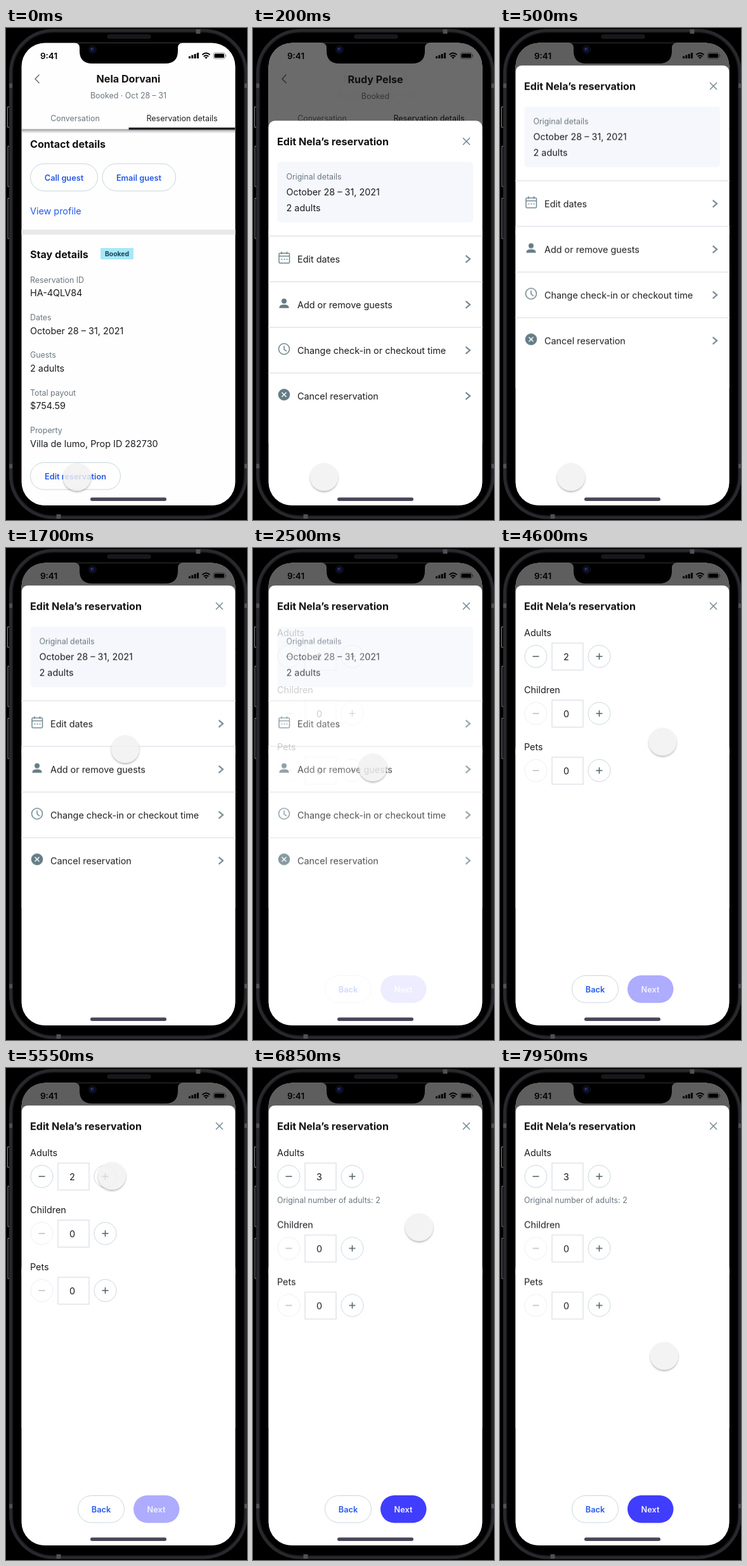
These frames come from a looping animation (380x776 px, 8000 ms). An HTML page:

```html
<!DOCTYPE html>
<html lang="en">
<head>
<meta charset="utf-8">
<title>Edit reservation</title>
<style>
html, body { margin: 0; width: 100%; height: 100%; overflow: hidden; background: #000; }
svg { display: block; width: 100vw; height: 100vh; }
text { font: 400 14.4px Inter, sans-serif; fill: #1b1c20; dominant-baseline: central; }
.small { font-size: 12.4px; fill: #6a7780; }
.tab { font-size: 12.5px; fill: #222; }
.title { font-size: 16.1px; font-weight: 700; fill: #121214; }
.button { font-size: 12.75px; font-weight: 600; fill: #2459ec; }
.mid { text-anchor: middle; }
.pill { fill: #fff; stroke: #c9d5dc; }
.line { stroke: #e1e3e7; stroke-width: 1.5; }
.icon { fill: none; stroke: #6f868f; stroke-width: 1.5; }
.sign { stroke: #4e616a; }
.solid { fill: #657d87; }
.off { opacity: .4; }

.anim { animation: 8s infinite both; }
.leave { animation-name: leave; }
.arrive { animation-name: arrive; }
.dim { animation-name: dim; }
.sheet { animation-name: rise; }
.menu { animation-name: menu; }
.form { animation-name: form; }
.before { animation-name: before; }
.after { animation-name: after; }
.shift { animation-name: shift; }
.next { animation-name: next; }
.cursor { animation-name: cursor; }

@keyframes leave {
  0% { opacity: 1; animation-timing-function: cubic-bezier(.25,1,.5,1); }
  4.375%, 100% { opacity: 0; }
}
@keyframes arrive {
  0% { opacity: 0; animation-timing-function: cubic-bezier(.33,1,.68,1); }
  4.375%, 100% { opacity: 1; }
}
@keyframes dim {
  0% { opacity: 0; animation-timing-function: cubic-bezier(.33,1,.68,1); }
  4.375%, 100% { opacity: .63; }
}
@keyframes rise {
  0% { transform: translateY(695px); animation-timing-function: cubic-bezier(.42,1,.78,1); }
  4.375%, 100% { transform: none; }
}
@keyframes menu {
  0%, 30.7% { opacity: 1; animation-timing-function: ease-out; }
  34.7%, 100% { opacity: 0; }
}
@keyframes form {
  0%, 30.7% { opacity: 0; animation-timing-function: ease-out; }
  34.7%, 100% { opacity: 1; }
}
@keyframes before {
  0%, 72% { opacity: 1; animation-timing-function: ease-out; }
  75.6%, 100% { opacity: 0; }
}
@keyframes after {
  0%, 72% { opacity: 0; animation-timing-function: ease-out; }
  75.6%, 100% { opacity: 1; }
}
@keyframes shift {
  0%, 72% { transform: none; animation-timing-function: ease-out; }
  75.6%, 100% { transform: translateY(23.5px); }
}
@keyframes next {
  0%, 72% { fill: #aeacff; animation-timing-function: ease-out; }
  75.6%, 100% { fill: #403dff; }
}
@keyframes cursor {
  0%, 9.5% { transform: translate(112px, 708px); animation-timing-function: ease-in-out; }
  20.8%, 21.5% { transform: translate(188px, 317px); animation-timing-function: ease-in-out; }
  29%, 33% { transform: translate(189px, 346px); animation-timing-function: ease-in-out; }
  40.6%, 54.4% { transform: translate(274px, 350.5px); animation-timing-function: ease-in-out; }
  60.6%, 62% { transform: translate(239px, 261px); animation-timing-function: ease-in-out; }
  66.9%, 68.2% { transform: translate(174px, 171px); }
  69.375%, 71.9% { transform: translate(167px, 170px); }
  73%, 80.7% { transform: translate(157px, 171px); animation-timing-function: ease-in-out; }
  85.6%, 95.7% { transform: translate(262px, 251px); animation-timing-function: ease-in-out; }
  99.375%, 100% { transform: translate(259px, 454px); }
}
</style>
</head>
<body>
<svg viewBox="0 0 380 776" preserveAspectRatio="none">
  <defs>
    <clipPath id="screen"><rect x="24.5" y="23.5" width="337" height="729.5" rx="37"/></clipPath>
    <filter id="soft" x="-30%" y="-30%" width="160%" height="170%">
      <feDropShadow dx="0" dy="2" stdDeviation="1.5" flood-opacity=".35"/>
    </filter>
    <linearGradient id="fade" x2="0" y2="1">
      <stop stop-color="#777" stop-opacity=".75"/><stop offset="1" stop-color="#999" stop-opacity="0"/>
    </linearGradient>
    <path id="chevron" d="M335.5 -5.5 342 0 335.5 5.5" fill="none" stroke="#7b8b95" stroke-width="2.3"/>
    <g id="minus"><circle cx="56.5" r="17.5" class="pill"/><path d="M51.5 0h10" class="icon sign"/></g>
    <g id="plus"><circle cx="156.5" r="17.5" class="pill"/><path d="M151.5 0h10M156.5 -5v10" class="icon sign"/></g>
    <rect id="box" x="82" y="-21" width="49" height="42.5" fill="#fff" stroke="#dde1e8" stroke-width="1.4"/>
  </defs>

  <rect width="380" height="776"/>
  <g fill="none" stroke="#8b8b90">
    <path d="M5.5 124.5H2.5V156.5H5.5M5.5 186.5H3V250H5.5M5.5 268.5H3V332H5.5"/>
    <rect x="7.5" y="4" width="371" height="768" rx="67" stroke="#29292d" stroke-width="5"/>
    <rect x="10.5" y="7" width="365" height="762" rx="64" stroke="#151518" stroke-width="1.5"/>
    <path d="M303 2v7M83 767v7M5 91h5M376 91h4M5 691h5M376 691h4" stroke="#505055" stroke-width="7"/>
  </g>
  <rect x="160" y="11" width="68" height="5" rx="2.5" fill="#161618" stroke="#29292c"/>

  <g clip-path="url(#screen)">
    <rect x="24" y="23" width="338" height="731" fill="#fff"/>
    <path d="M52.5 73.5 46 80.2 52.5 87" fill="none" stroke="#6b7074" stroke-width="1.5"/>

    <g class="anim leave">
      <text x="193" y="80" class="title mid">Nela Dorvani</text>
      <text x="193" y="106.500" class="small mid">Booked · Oct 28 – 31</text>
    </g>
    <g class="anim arrive">
      <text x="193" y="80.500" class="title mid">Rudy Pelse</text>
      <text x="193" y="107" class="small mid">Booked</text>
    </g>

    <text x="109" y="142.5" class="small mid">Conversation</text>
    <text x="277.5" y="142.5" class="tab mid">Reservation details</text>
    <rect x="24" y="159.5" width="338" height="7" fill="url(#fade)"/>
    <rect x="193.5" y="157" width="168" height="3.5" fill="#202226"/>

    <text x="38" y="182.5" class="title">Contact details</text>
    <rect x="38.5" y="214" width="106" height="43" rx="21.5" class="pill"/>
    <text x="91.5" y="236" class="button mid">Call guest</text>
    <rect x="152" y="214" width="115.5" height="43" rx="21.5" class="pill"/>
    <text x="209.5" y="236" class="button mid">Email guest</text>
    <text x="38" y="288" style="fill:#2459ec">View profile</text>
    <rect x="24" y="318" width="338" height="8" fill="#e9eaeb"/>

    <text x="38" y="356.5" class="title">Stay details</text>
    <rect x="149" y="347" width="52" height="18" rx="1.5" fill="#a9e8f8"/>
    <text x="175" y="356" class="mid" style="font-size:10.4px;font-weight:700;fill:#12465a">Booked</text>
    <text x="38" y="397" class="small">Reservation ID</text>
    <text x="38" y="417.5">HA-4QLV84</text>
    <text x="38" y="456" class="small">Dates</text>
    <text x="38" y="477">October 28 – 31, 2021</text>
    <text x="38" y="515.5" class="small">Guests</text>
    <text x="38" y="536.5">2 adults</text>
    <text x="38" y="575" class="small">Total payout</text>
    <text x="38" y="595.5">$754.59</text>
    <text x="38" y="634" class="small">Property</text>
    <text x="38" y="655">Villa de lumo, Prop ID 282730</text>
    <rect x="38.5" y="685.5" width="142" height="42.5" rx="21.2" class="pill"/>
    <text x="109.5" y="707" class="button mid">Edit reservation</text>

    <rect x="24" y="23" width="338" height="731" class="anim dim"/>

    <text x="67.5" y="44" class="mid" style="font-size:13.5px;font-weight:600;fill:#000">9:41</text>
    <path d="M288 44.5h3v3.5h-3zM292.3 42.800h3v5.2h-3zM296.6 41h3v7h-3zM300.9 39h3v9h-3z"/>
    <path d="M309.5 42.3Q315.5 36.8 321.5 42.3M311.8 44.9Q315.5 41.5 319.2 44.9" fill="none" stroke="#000" stroke-width="2"/>
    <path d="M313.3 46.3Q315.5 44.6 317.7 46.3L315.5 48.7Z"/>
    <rect x="327" y="39" width="18.5" height="9.5" rx="2.8" fill="none" stroke="#000" stroke-opacity=".4"/>
    <rect x="328.5" y="40.5" width="15.5" height="6.5" rx="1.5"/>
    <path d="M346.8 42v3.5" stroke="#000" stroke-opacity=".5"/>

    <path d="M108 23Q116 24 116 31V36Q116 56 136 56H251Q271 56 271 36V31Q271 24 279 23Z"/>
    <circle cx="136.5" cy="34" r="7" fill="#0b0b14"/>
    <circle cx="136" cy="34" r="3.5" fill="#15194a"/>
    <circle cx="135" cy="32.5" r="1" fill="#47599a"/>

    <g class="anim sheet">
      <rect x="24.5" y="59" width="337" height="730" rx="10" fill="#fff"/>
      <text x="38" y="91.5" class="title">Edit Nela’s reservation</text>
      <path d="M331 86l11 11m0-11l-11 11" class="icon"/>

      <g class="anim menu">
        <rect x="38.5" y="124" width="308.5" height="95.5" rx="5" fill="#f5f7fc"/>
        <text x="52.5" y="147" class="small">Original details</text>
        <text x="52.5" y="171">October 28 – 31, 2021</text>
        <text x="52.5" y="196.5">2 adults</text>
        <path d="M24 241h338M24 313h338M24 385h338M24 457h338" class="line"/>

        <text x="70" y="277">Edit dates</text>
        <text x="70" y="349">Add or remove guests</text>
        <text x="70" y="421">Change check-in or checkout time</text>
        <text x="70" y="493">Cancel reservation</text>
        <use href="#chevron" y="277"/><use href="#chevron" y="349"/>
        <use href="#chevron" y="421"/><use href="#chevron" y="493"/>

        <rect x="41" y="268" width="16.5" height="15.5" rx="1.5" class="icon"/>
        <path d="M41 272.5h16.5M45 265.5v4M53.5 265.5v4" class="icon"/>
        <path d="M44.5 277.5h10" class="icon" stroke-dasharray="2"/>
        <circle cx="49" cy="343.5" r="4" class="solid"/>
        <path d="M41.5 354.5V353Q42 349 49 349T56.5 353V354.5Z" class="solid"/>
        <circle cx="49" cy="419" r="8.5" class="icon"/>
        <path d="M49 414v5.5l4 3" class="icon"/>
        <circle cx="49" cy="491" r="9.3" class="solid"/>
        <path d="M45.5 487.5l7 7m0-7l-7 7" class="icon" style="stroke:#fff"/>
      </g>

      <g class="anim form">
        <text x="38" y="133.5">Adults</text>
        <use href="#minus" y="171"/><use href="#box" y="171"/><use href="#plus" y="171"/>
        <text x="104.5" y="171.5" class="mid anim before">2</text>
        <text x="104.5" y="171.5" class="mid anim after">3</text>
        <text x="38" y="208" class="small anim after">Original number of adults: 2</text>

        <g class="anim shift">
          <text x="38" y="223.5">Children</text>
          <use href="#minus" y="261" class="off"/><use href="#box" y="261"/><use href="#plus" y="261"/>
          <text x="104.5" y="261.5" class="mid">0</text>
          <text x="38" y="313.5">Pets</text>
          <use href="#minus" y="351" class="off"/><use href="#box" y="351"/><use href="#plus" y="351"/>
          <text x="104.5" y="351.5" class="mid">0</text>
        </g>

        <rect x="113.5" y="674.5" width="73" height="42.5" rx="21.2" class="pill"/>
        <text x="150" y="696" class="button mid">Back</text>
        <rect x="201" y="674" width="72.5" height="43.5" rx="21.7" class="anim next"/>
        <text x="237" y="696" class="button mid" style="fill:#f1f0ff">Next</text>
      </g>
    </g>

    <rect x="133" y="740.5" width="120" height="5.5" rx="2.7" fill="#48475a"/>
  </g>

  <g class="anim cursor">
    <circle r="22" fill="#f1f1f1" opacity=".82" filter="url(#soft)"/>
  </g>
</svg>
</body>
</html>
```
